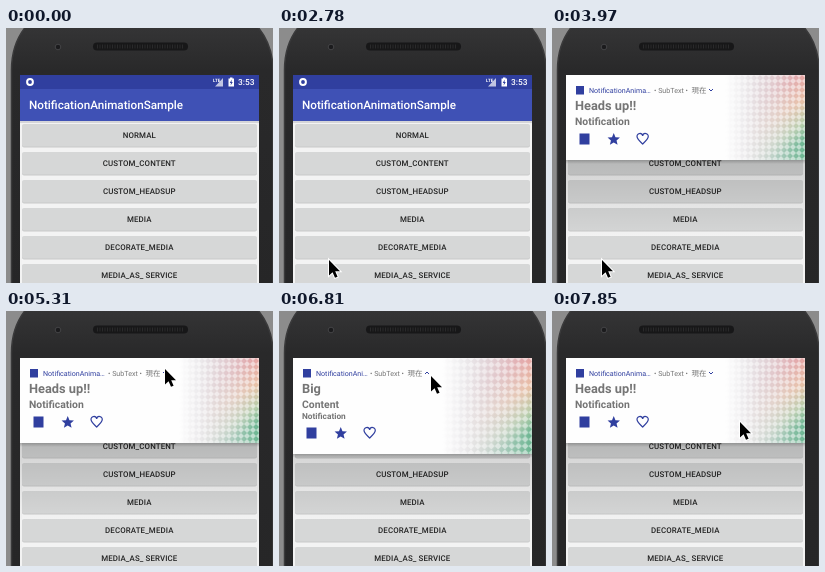
These frames come from a looping animation (267 by 255 pixels, 8 s). An HTML page:

```html
<!DOCTYPE html>
<html lang="en">
<head>
<meta charset="utf-8">
<title>Heads-up notification</title>
<style>
html, body { margin: 0; width: 100%; height: 100%; overflow: hidden; background: #8c8c8c; }
svg { display: block; width: 100vw; height: 100vh; font-family: Roboto, "Noto Sans CJK JP", "Noto Sans CJK", sans-serif; text-rendering: geometricPrecision; }
.btn { font-size: 7.9px; font-weight: 500; letter-spacing: .12px; fill: #222; text-anchor: middle; }
.bold { font-weight: 700; fill: #757575; }
.head { font-size: 7.1px; fill: #757575; }
.ink { fill: #303f9f; }
.line { fill: none; stroke: #303f9f; }
</style>
</head>
<body>
<svg viewBox="0 0 267 255" preserveAspectRatio="none">
  <defs>
    <linearGradient id="body" x2="0" y2="1">
      <stop stop-color="#363637"/><stop offset=".18" stop-color="#29292a"/><stop offset="1" stop-color="#262627"/>
    </linearGradient>
    <linearGradient id="scrim" x2="0" y2="1">
      <stop stop-opacity=".3"/><stop offset="1" stop-opacity="0"/>
    </linearGradient>
    <linearGradient id="shade" x2="0" y2="1">
      <stop stop-opacity=".25"/><stop offset="1" stop-opacity="0"/>
    </linearGradient>
    <linearGradient id="hues" x2=".6" y2="1">
      <stop stop-color="#dcb4c0"/><stop offset=".4" stop-color="#e08c90"/><stop offset=".65" stop-color="#e6b494"/>
      <stop offset=".85" stop-color="#a8c498"/><stop offset="1" stop-color="#4fa87c"/>
    </linearGradient>
    <linearGradient id="dust">
      <stop offset=".2" stop-color="#b8b2bb"/><stop offset="1" stop-color="#b8b2bb" stop-opacity="0"/>
    </linearGradient>
    <linearGradient id="fade">
      <stop stop-color="#fff" stop-opacity="0"/><stop offset=".5" stop-color="#fff" stop-opacity=".6"/><stop offset="1" stop-color="#fff"/>
    </linearGradient>
    <pattern id="check" width="6" height="6" patternUnits="userSpaceOnUse">
      <path d="M0 0H6V6H0Z" fill="#fff" opacity=".4"/><path d="M3 0L6 3 3 6 0 3Z" fill="#fff" opacity=".75"/>
    </pattern>
    <mask id="weave">
      <rect x="-80" width="80" height="85" fill="url(#fade)"/>
    </mask>
    <mask id="cells">
      <rect x="-80" width="80" height="85" fill="url(#check)"/>
    </mask>
    <clipPath id="screen"><path d="M14 47H253V255H14Z"/></clipPath>
    <path id="star" d="M12 17.3L18.2 21 16.5 14 22 9.2 14.8 8.6 12 2 9.2 8.6 2 9.2 7.5 14 5.8 21Z"/>
    <path id="heart" d="M12 20C6 14.6 3 12 3 8.5A4.5 4.5 0 0 1 12 6.8A4.5 4.5 0 0 1 21 8.5C21 12 18 14.6 12 20Z" stroke-width="2"/>
    <g id="actions">
      <rect class="ink" x="27.5" y="-5.5" width="10" height="11"/>
      <use href="#star" class="ink" transform="translate(54.3 -7.2) scale(.62)"/>
      <use href="#heart" class="line" transform="translate(83.2 -7.4) scale(.62)"/>
    </g>
  </defs>

  <path d="M5.5 260V42C5.5 22 12 6 24 -6H247C259 5 267 22 267 42V260Z" fill="url(#body)" stroke="#3a3a3b" stroke-width="1.5"/>
  <rect x="87" y="14.5" width="95" height="8" rx="4" fill="#171718"/>
  <path d="M91 18.5H178" stroke="#2a2a2b" stroke-width="4" stroke-dasharray="1 1.5"/>
  <circle cx="52" cy="19" r="2.8" fill="#1b1b1d" stroke="#444446"/>

  <g clip-path="url(#screen)">
    <path d="M14 47H253V255H14Z" fill="#f3f3f3"/>
    <path d="M14 47H253V61H14Z" fill="#303f9f"/>
    <path d="M14 61H253V93H14Z" fill="#3f51b5"/>
    <path d="M14 93H253V95H14Z" fill="#d5d5d8"/>
    <circle cx="24" cy="54" r="2.9" fill="none" stroke="#fff" stroke-width="2"/>
    <g fill="#fff">
      <text x="207" y="53.5" font-size="4.5" font-weight="700">LTE</text>
      <path d="M217 50V58.5H209Z" opacity=".7"/>
      <path d="M224 49.5H226.5V50.5H228V58.5H222.5V50.5H224Z"/>
      <path d="M225.8 51.5L223.7 55H225L224.6 57.5 226.8 54H225.5Z" fill="#303f9f"/>
      <text x="232" y="57" font-size="8.4" font-weight="500">3:53</text>
      <text x="23" y="81" font-size="11.7" font-weight="500">NotificationAnimationSample</text>
    </g>
    <g id="buttons"></g>
    <rect id="dim" x="14" y="47" width="239" height="163" fill="url(#scrim)"/>
    <g id="card">
      <rect id="shadow" x="14" width="239" height="5" fill="url(#shade)"/>
      <rect id="paper" x="14" y="47" width="239" fill="#fefefe"/>
      <g id="art">
        <g mask="url(#weave)"><g mask="url(#cells)">
          <rect x="-80" width="80" height="85" fill="url(#hues)"/>
          <rect x="-80" width="80" height="85" fill="url(#dust)"/>
        </g></g>
      </g>
      <rect class="ink" x="24" y="58" width="8" height="8.5"/>
      <g id="small">
        <text class="head ink" x="37" y="65">NotificationAnima…</text>
        <g class="head"><text x="102" y="65">• SubText •</text><text x="139.5" y="65" font-size="7.5">現在</text></g>
        <path class="line" d="M157 61L159 63 161 61"/>
        <text class="bold" x="23" y="82" font-size="12.8">Heads up!!</text>
        <text class="bold" x="23" y="97" font-size="10.4">Notification</text>
      </g>
      <g id="big">
        <text class="head ink" x="37" y="65">NotificationAni…</text>
        <g class="head"><text x="91" y="65">• SubText •</text><text x="128.5" y="65" font-size="7.5">現在</text></g>
        <path class="line" d="M146 63L148 61 150 63"/>
        <text class="bold" x="23" y="82" font-size="12.8">Big</text>
        <text class="bold" x="23" y="97" font-size="10.4">Content</text>
        <text class="bold" x="23" y="108" font-size="8.3">Notification</text>
      </g>
      <use id="row" href="#actions"/>
    </g>
  </g>
  <path id="cursor" d="M1 1V16.5L4.6 13.2 7 18.8 9.6 17.7 7.2 12.2H12Z" stroke="#fff" stroke-width="2" paint-order="stroke"/>
</svg>
<script>
const $ = id => document.getElementById(id);
const set = (id, attrs) => { for (const a in attrs) $(id).setAttribute(a, attrs[a]); };

$("buttons").innerHTML = ["NORMAL", "CUSTOM_CONTENT", "CUSTOM_HEADSUP", "MEDIA", "DECORATE_MEDIA", "MEDIA_AS_ SERVICE"]
  .map((label, i) => {
    const y = 96 + 28 * i;
    return `<rect x="16" y="${y + 1}" width="235" height="22.5" rx="2" fill="#c9caca"/>
      <rect x="16" y="${y}" width="235" height="22.5" rx="2" fill="#d6d7d7"/>
      <text class="btn" x="133.3" y="${y + 14}">${label}</text>`;
  }).join("");

const LOOP = 8000, START = 695, TICK = 148.6;

// Tracks hold [tick, values...], linear in between
const pointer = [[0, 247, 36], [4, 161, 157], [7, 112, 217], [8, 108, 221], [10, 108, 221], [11, 80, 209],
  [12, 80, 209], [13, 63, 220], [14, 49, 231], [23, 49, 231], [24, 56, 218], [29, 158, 57], [37, 158, 57],
  [39, 152, 89], [41, 151, 64], [43, 148, 60], [44, 148, 60], [48, 187, 110]];
const entry = [[19, 0], [20, .4], [21, .85], [22, 1]];
const growth = [[31, 0], [32, .45], [33, .85], [34, 1], [44, 1], [45, .85], [46, .4], [47, .1], [48, 0]];

function at(track, k) {
  const i = track.findIndex(p => p[0] > k);
  if (i < 0) return track[track.length - 1].slice(1);
  if (i === 0) return track[0].slice(1);
  const a = track[i - 1], b = track[i], u = (k - a[0]) / (b[0] - a[0]);
  return a.slice(1).map((v, j) => v + (b[j + 1] - v) * u);
}

function draw(t) {
  const k = Math.floor((t - START) / TICK);
  const [x, y] = at(pointer, k), [shown] = at(entry, k), [open] = at(growth, k);
  const height = 85 + 11 * open;
  set("cursor", { transform: `translate(${x} ${y})`, visibility: k < 0 ? "hidden" : "visible" });
  set("dim", { opacity: shown });
  set("card", { transform: `translate(0 ${-90 * (1 - shown)})`, visibility: shown ? "visible" : "hidden" });
  set("paper", { height });
  set("shadow", { y: 46 + height });
  set("art", { transform: `translate(253 47) scale(${height / 85})` });
  set("small", { opacity: 1 - open });
  set("big", { opacity: open });
  set("row", { y: 111 + 11 * open });
}

function frame() {
  draw(performance.now() % LOOP);
  requestAnimationFrame(frame);
}
frame();
</script>
</body>
</html>
```
